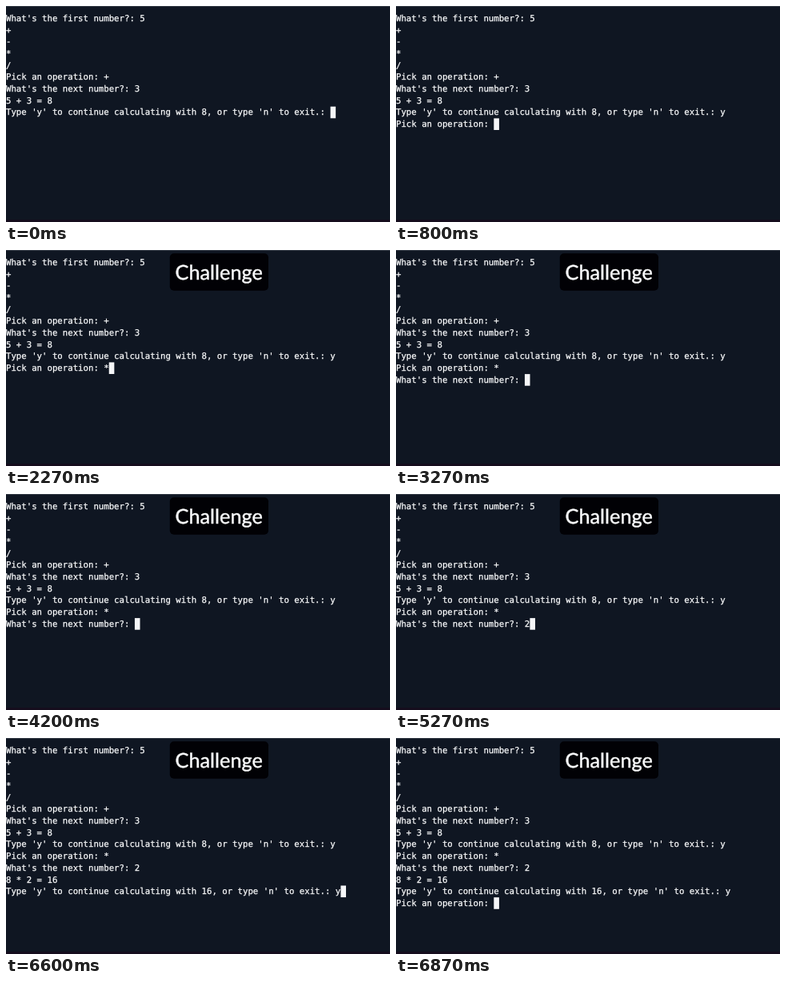
Recreate the animation shown at these times as an HTML page. Size 480 by 270 pixels, loop 8 s.

```html
<!DOCTYPE html>
<html lang="en">
<head>
<meta charset="utf-8">
<title>Terminal calculator</title>
<style>
  html, body { margin: 0; width: 100%; height: 100%; overflow: hidden; background: #0f1622; }
  svg { display: block; width: 480px; height: 270px; }
  text { fill: #fafbfc; stroke: #fafbfc; text-rendering: geometricPrecision; white-space: pre; }
  #lines { font: 10.69px "DejaVu Sans Mono", monospace; stroke-width: 0.25px; }
  #title text { font: 25.3px Lato, "Open Sans", sans-serif; text-anchor: middle; stroke-width: 0.45px; }
</style>
</head>
<body>
<svg viewBox="0 0 480 270">
  <rect width="480" height="270" fill="#0f1622"/>
  <rect width="480" height="1" fill="#363e48"/>
  <rect y="267" width="480" height="3" fill="#150d1d"/>
  <g id="lines"></g>
  <rect id="cursor" width="6.6" height="14.6" fill="#f5f6f8"/>
  <g id="title">
    <rect x="204.8" y="4.3" width="123.2" height="46.5" rx="5" fill="#010105"/>
    <text x="266.2" y="37.4">Challenge</text>
  </g>
</svg>
<script>
const LOOP = 8000, CHAR = 6.437, PITCH = 14.7, TOP = 8.1, BASE = 18.8;
const TITLE_AT = 930;
const PICK = "Pick an operation: ";
const NEXT = "What's the next number?: ";
const ask = n => `Type 'y' to continue calculating with ${n}, or type 'n' to exit.: `;

const start = ["What's the first number?: 5", "+", "-", "*", "/",
  PICK + "+", NEXT + "3", "5 + 3 = 8", ask(8)].join("\n");

// [time in ms, text added to the terminal]
const steps = [
  [0, start],
  [200, "y"],
  [800, "\n" + PICK],
  [2270, "*"],
  [3270, "\n" + NEXT],
  [5270, "2"],
  [6130, "\n8 * 2 = 16\n" + ask(16)],
  [6600, "y"],
  [6800, "\n" + PICK]
];

const el = id => document.getElementById(id);
const lines = el("lines"), cursor = el("cursor"), title = el("title");
let shown = null;

function draw(output) {
  const rows = output.split("\n");
  lines.replaceChildren(...rows.map((row, i) => {
    const t = document.createElementNS("http://www.w3.org/2000/svg", "text");
    t.setAttribute("x", 0);
    t.setAttribute("y", BASE + i * PITCH);
    t.textContent = row;
    return t;
  }));
  const last = rows.length - 1;
  cursor.setAttribute("x", rows[last].length * CHAR);
  cursor.setAttribute("y", TOP + last * PITCH);
}

function frame() {
  const time = performance.now() % LOOP;
  const output = steps.filter(([at]) => at <= time).map(s => s[1]).join("");
  if (output !== shown) draw(shown = output);
  title.style.visibility = time >= TITLE_AT ? "visible" : "hidden";
  requestAnimationFrame(frame);
}
frame();
</script>
</body>
</html>
```
